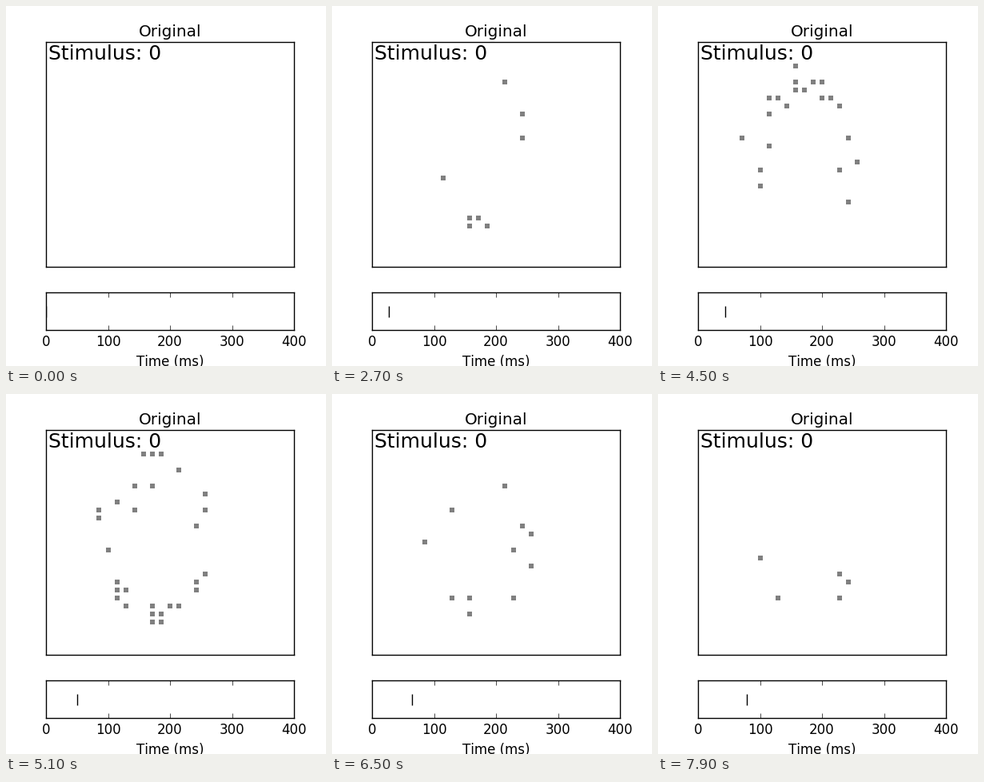
Recreate the animation shown at these times as a matplotlib script. Size 400 px wide and 450 px high, loop 8 s.

```python
import numpy as np
import matplotlib.pyplot as plt
from matplotlib.animation import FuncAnimation

plt.rcParams.update({
    "font.family": "DejaVu Sans",
    "text.kerning_factor": 6,
    "axes.linewidth": 1.0,
    "xtick.direction": "in",
    "xtick.top": True,
    "xtick.major.size": 4,
    "xtick.major.width": 0.5,
})

W, H = 400, 450
GRID = 28
STEPS = 80
STEP_MS = 100
SILENT = 6      # steps before the ring begins to fire
STRAYS = {1: (25, 6), 18: (27, 12), 72: (24, 18)}


def spikes(n):
    """Columns and rows of the cells that fire at step n."""
    rng = np.random.default_rng(n)
    cells = set()
    if n >= SILENT:
        # Noisy ring like a handwritten zero; activity peaks mid-way.
        count = 2 + rng.poisson(20 * np.exp(-((n - 49) / 22) ** 2))
        a = rng.uniform(0, 2 * np.pi, count)
        cols = 12.2 + 5.4 * np.cos(a) + rng.normal(0, 0.8, count)
        rows = 14 + 9.3 * np.sin(a) + rng.normal(0, 0.9, count)
        cells.update(zip(np.rint(cols).clip(5, 19), np.rint(rows).clip(3, 26)))
    if n in STRAYS:
        cells.add(STRAYS[n])
    return zip(*cells) if cells else ([], [])


def add_panel(top, bottom):
    return fig.add_axes([50 / W, 1 - bottom / H, 310 / W, (bottom - top) / H])


def label(x, y, text, size, ha="center"):
    fig.text(x / W, 1 - y / H, text, fontsize=size, ha=ha, va="baseline")


fig = plt.figure(figsize=(W / 100, H / 100), dpi=100, facecolor="white")

cells_ax = add_panel(45, 325.52)
cells_ax.set(xlim=(0, GRID), ylim=(GRID, 0), xticks=[], yticks=[])
dots, = cells_ax.plot([], [], "s", color="gray", ms=4, mew=0)

time_ax = add_panel(358.25, 405)
time_ax.set(xlim=(0, 400), ylim=(0, 1), yticks=[],
            xticks=range(0, 401, 100), xticklabels=[])
cursor, = time_ax.plot([], [], "|", color="black", ms=10, mew=1)

label(205, 38, "Original", 14.4)
label(53, 67, "Stimulus: 0", 18, ha="left")
for t in range(0, 401, 100):
    label(50 + 0.775 * t, 425, str(t), 12)
label(205, 450, "Time (ms)", 12)


def draw(n):
    dots.set_data(*spikes(n))
    cursor.set_data([n - 0.5], [0.5])
    return dots, cursor


anim = FuncAnimation(fig, draw, frames=STEPS, init_func=lambda: draw(0),
                     interval=STEP_MS, repeat=True, repeat_delay=0)
plt.show()
```
